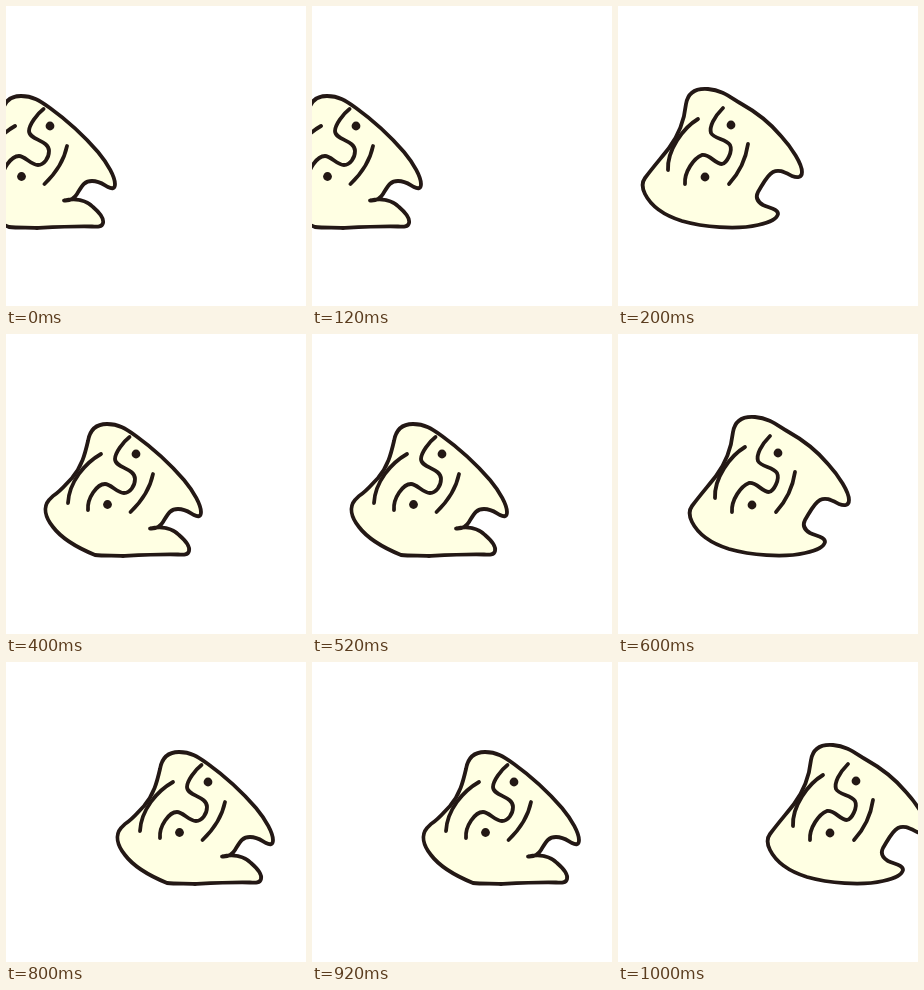
Recreate the animation shown at these times as an HTML page with a canvas. Size 300 by 300 pixels, loop 1200 ms.

```html
<!DOCTYPE html>
<html lang="en">
<head>
<meta charset="utf-8">
<title>Hopping face</title>
<style>
html, body { margin: 0; width: 100%; height: 100%; overflow: hidden; background: #fff; }
canvas { display: block; width: 100vw; height: 100vh; }
</style>
</head>
<body>
<canvas id="stage" width="300" height="300"></canvas>
<script>
const ctx = document.getElementById('stage').getContext('2d');
const INK = '#231815', SKIN = '#ffffe3';
const STEP = 200;

const stretched = {
  body: new Path2D(`M68 98 C70 86 78 82 90 83 C104 84 112 91 122 97
    C140 107 153 118 163 130 C174 142 184 158 184 166 C184 172 179 172 174 170
    C166 166 161 163 155 166 C149 169 145 178 140 186 C137 192 140 196 145 199
    C151 202 160 203 160 208 C159 213 150 217 140 219 C118 224 85 221 64 215
    C45 209 33 200 27 188 C24 182 24 176 27 172 C36 160 44 151 51 142
    C60 130 66 117 68 98 Z`),
  lines: new Path2D(`M80 113 C65 122 49 144 50 164
    M105 102 C96 111 91 121 93 127 C96 133 108 133 112 139
    C115 145 109 157 104 158 C97 158 92 148 84 149 C76 152 66 166 67 178
    M130 138 C128 152 121 167 111 178`),
  eyes: [[113, 119], [87, 171]]
};

const crouched = {
  body: new Path2D(`M82 107 C84 95 91 90 101 90 C113 90 120 95 130 102
    C148 115 165 131 178 146 C188 158 195 171 195 178 C195 183 192 183 188 181
    C184 179 180 175 172 175 C164 175 162 180 157 188 C154 193 150 195 144 194.5
    C155 192 166 194 173 201 C180 207 184 213 183 217 C182 221 178 221 172 220.5
    C154 220 136 221 117 222 C107 221.5 97 222 89 221 C72 214 56 205 47 193
    C39 183 37 173 43 166 L47 162 C55 157 60 150 66 144
    C76 132 79 120 82 107 Z`),
  lines: new Path2D(`M95 120 C79 129 63 148 62 169
    M123.5 103 C117 108 109 119 109 125 C109 134 129 134 129 145
    C129 152 124 159 118 159 C111 159 105 150 99 150 C91 150 81 164 82 176
    M147 140 C144 155 137 166 124.5 178`),
  eyes: [[130, 120], [101.5, 170.5]]
};

// Horizontal offset of each hop, poses alternate
const hops = [-86, 0, 0, 47, 72, 125];

function drawFace(pose, x) {
  ctx.save();
  ctx.translate(x, 0);
  ctx.fillStyle = SKIN;
  ctx.fill(pose.body);
  ctx.strokeStyle = INK;
  ctx.lineWidth = 3.8;
  ctx.lineCap = ctx.lineJoin = 'round';
  ctx.stroke(pose.body);
  ctx.stroke(pose.lines);
  ctx.fillStyle = INK;
  for (const [ex, ey] of pose.eyes) {
    ctx.beginPath();
    ctx.arc(ex, ey, 4.4, 0, Math.PI * 2);
    ctx.fill();
  }
  ctx.restore();
}

const start = performance.now();

function render() {
  const t = Math.max(0, performance.now() - start);
  const i = Math.floor(t / STEP) % hops.length;
  ctx.fillStyle = '#fff';
  ctx.fillRect(0, 0, 300, 300);
  drawFace(i % 2 ? stretched : crouched, hops[i]);
  requestAnimationFrame(render);
}
render();
</script>
</body>
</html>
```
